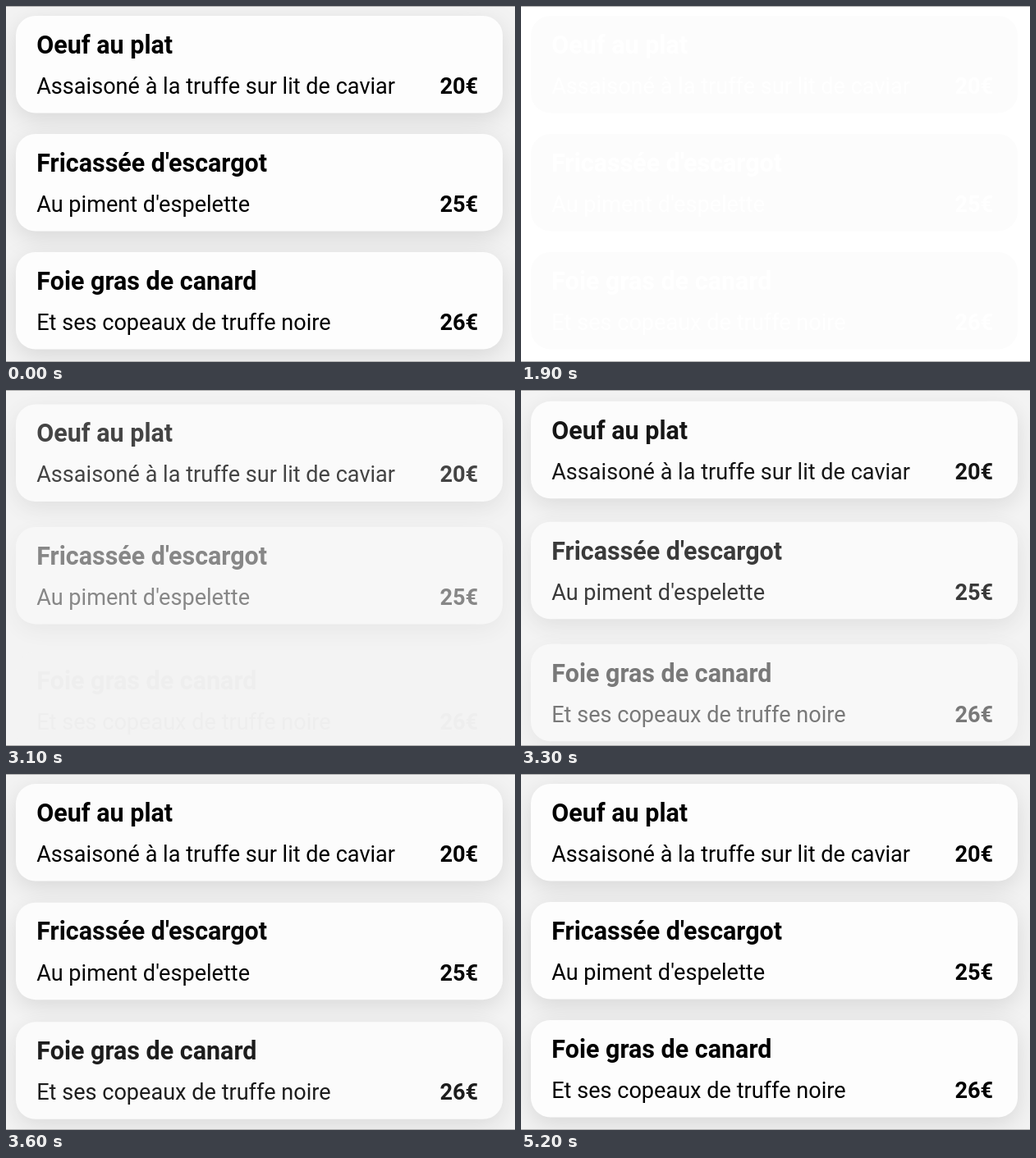
An HTML page that plays this animation: 620 px wide and 434 px high, repeating every 5.3 s.

```html
<!DOCTYPE html>
<html lang="fr">
<head>
<meta charset="utf-8">
<title>Menu</title>
<style>
  html, body { margin: 0; width: 100%; height: 100%; overflow: hidden; background: #f3f3f3; }
  svg { display: block; position: absolute; left: 0; top: 0; }
  text { font: 400 27.1px Roboto, sans-serif; }
  .title { font-size: 30.45px; font-weight: 700; }
  .price { font-weight: 700; }
  .card rect { fill: #fdfdfd; filter: drop-shadow(0 8px 14px rgba(0, 0, 0, .11)); }
  .blank rect { fill: #fcfcfc; }
  .blank text { fill: #fff; }
  .blank .sheet { fill: #fff; }
</style>
</head>
<body>
<svg width="620" height="434" viewBox="0 0 620 434">
  <rect width="620" height="434" fill="#f3f3f3"/>
  <g id="menu"></g>
  <g id="blank" class="blank"></g>
  <path d="M0 .5H620M0 433.5H620" stroke="#b0b0b0"/>
</svg>
<script>
const LOOP = 5300, TICK = 100;
const LEAVE = [1550, 1900], RETURN = [2700, 2850];
const ENTER = { start: 2755, length: 1000, stagger: 170, rise: 19.5 };

const dishes = [
  ["Oeuf au plat", "Assaisoné à la truffe sur lit de caviar", "20€"],
  ["Fricassée d'escargot", "Au piment d'espelette", "25€"],
  ["Foie gras de canard", "Et ses copeaux de truffe noire", "26€"]
];

const card = ([title, detail, price], i) => `
  <g transform="translate(0 ${i * 144})"><g class="card">
    <rect x="12" y="12" width="593" height="118.5" rx="24"/>
    <text class="title" x="37.3" y="57.8">${title}</text>
    <text x="37.2" y="107">${detail}</text>
    <text class="price" x="528.5" y="107">${price}</text>
  </g></g>`;

const menu = document.getElementById("menu");
const blank = document.getElementById("blank");
menu.innerHTML = dishes.map(card).join("");
blank.innerHTML = '<rect class="sheet" width="620" height="434"/>' +
  dishes.map(card).join("").replaceAll('class="card"', "");
const cards = [...menu.querySelectorAll(".card")];

const ramp = (t, a, b) => Math.min(1, Math.max(0, (t - a) / (b - a)));
const easeOut = p => 1 - (1 - p) ** 3;

function draw(t) {
  blank.style.opacity = ramp(t, ...LEAVE) - ramp(t, ...RETURN);
  cards.forEach((el, i) => {
    const start = ENTER.start + i * ENTER.stagger;
    const shown = t < RETURN[0] ? 1 : easeOut(ramp(t, start, start + ENTER.length));
    el.style.opacity = shown;
    el.style.transform = `translateY(${ENTER.rise * (1 - shown)}px)`;
  });
}

const begin = performance.now();
function frame() {
  const t = (performance.now() - begin) % LOOP;
  draw(Math.floor(t / TICK) * TICK);
  requestAnimationFrame(frame);
}
frame();
</script>
</body>
</html>
```
